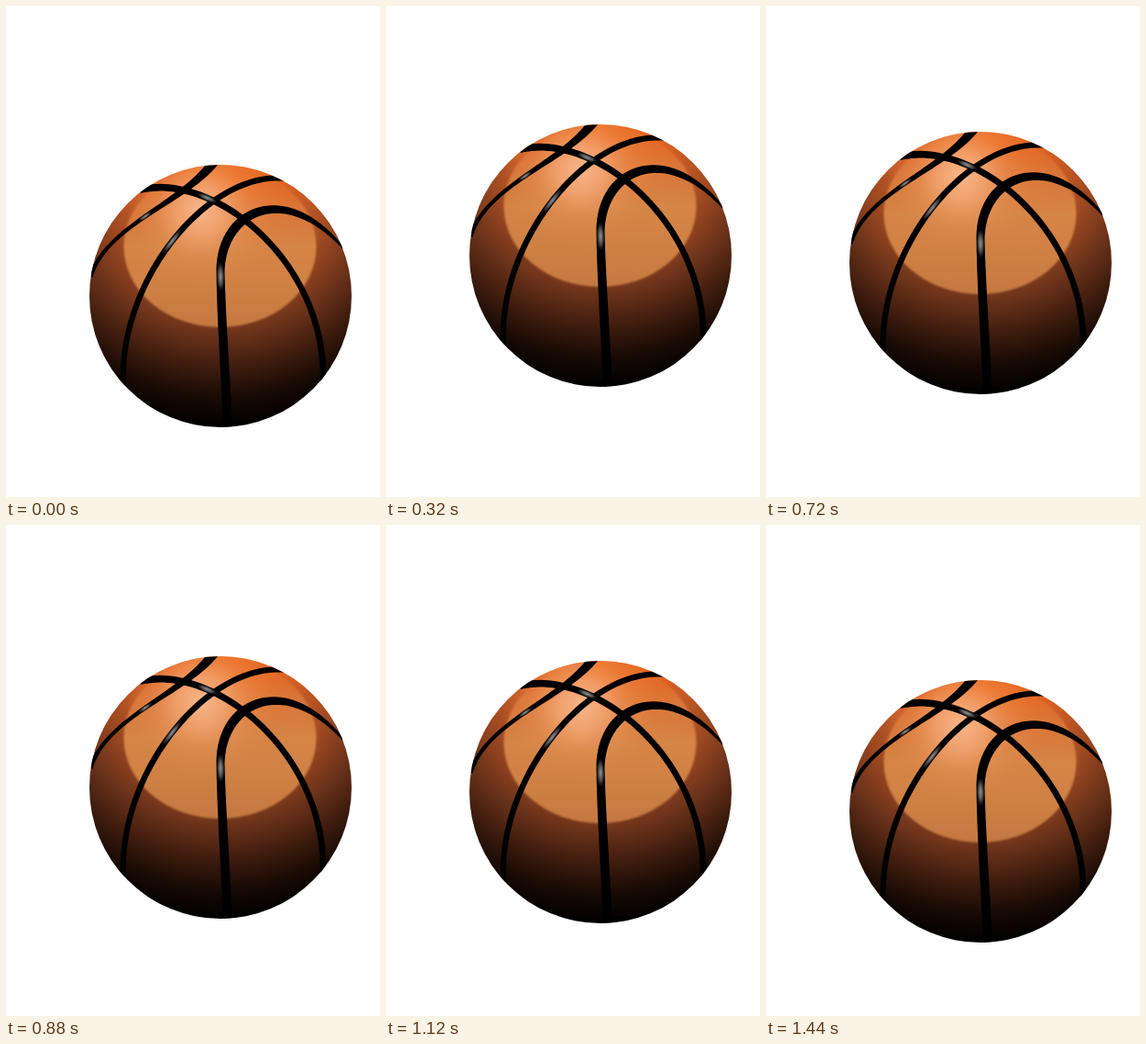
These frames come from a looping animation (408x535 px, 1480 ms). An HTML page with a canvas:

```html
<!DOCTYPE html>
<html lang="en">
<head>
<meta charset="utf-8">
<title>Floating basketball</title>
<style>
  html, body { margin: 0; width: 100%; height: 100%; overflow: hidden; background: #fff; }
  canvas { display: block; }
</style>
</head>
<body>
<canvas id="stage" width="408" height="535"></canvas>
<script>
const LOOP = 1480, STEP = 40, R = 143, TOP = 173;
const CX = 234, CY = TOP + R;

// Turning points of the float: [time in ms, top of the ball]
const keys = [[0, 173], [320, 129], [480, 134.4], [720, 137],
              [880, 143], [1000, 152], [1180, 146], [1440, 169.4]];

// Cubic curves with control values for a varying width; a glint sits at one place on some
const seams = [
  { path: [[228, 168], [196, 214], [111, 237], [92, 295]], width: [11, 2, 5], glint: { at: .52, length: 9 } },
  { path: [[146, 200], [231, 181], [351, 282], [346, 412]], width: [8, 6, 7], glint: { at: .27, length: 12 } },
  { path: [[306, 188], [222, 178], [122, 298], [128, 414]], width: [6, 7, 6], glint: { at: .51, length: 17 } },
  { path: [[368, 264], [305, 190], [234, 222], [234, 290]], width: [2.5, 13, 9] },
  { path: [[234, 290], [235, 345], [240, 410], [242, 465]], width: [9, 10, 10], glint: { at: .03, length: 16 } }
];

const mix = (a, b, u) => a + (b - a) * u;

// Repeated mixing of neighbours gives a point on a curve of any degree
function bezier(values, u) {
  while (values.length > 1) values = values.slice(1).map((v, i) => mix(values[i], v, u));
  return values[0];
}

function seamPoint({ path, width }, u) {
  const [x, y] = [0, 1].map(k => bezier(path.map(p => p[k]), u));
  const [dx, dy] = [0, 1].map(k => bezier(path.slice(1).map((p, i) => p[k] - path[i][k]), u));
  return { x, y, w: bezier(width, u), angle: Math.atan2(dy, dx) };
}

function keyAt(i) {
  const n = keys.length, turn = Math.floor(i / n), [t, y] = keys[i - turn * n];
  return [t + turn * LOOP, y];
}

// Speed at a key: zero where the ball turns back
function speed(i) {
  const [t0, y0] = keyAt(i - 1), [, y] = keyAt(i), [t1, y1] = keyAt(i + 1);
  return (y - y0) * (y1 - y) <= 0 ? 0 : (y1 - y0) / (t1 - t0);
}

function ballTop(time) {
  const i = keys.findLastIndex(([t]) => t <= time);
  const [t0, a] = keyAt(i), [t1, b] = keyAt(i + 1), third = (t1 - t0) / 3;
  return bezier([a, a + speed(i) * third, b - speed(i + 1) * third, b], (time - t0) / (t1 - t0));
}

function addStops(gradient, colors) {
  colors.forEach((color, i) => gradient.addColorStop(i / (colors.length - 1), color));
  return gradient;
}

function drawSeam(g, seam) {
  const left = [], right = [];
  for (let i = 0; i <= 60; i++) {
    const { x, y, w, angle } = seamPoint(seam, i / 60);
    const ox = -Math.sin(angle) * w / 2, oy = Math.cos(angle) * w / 2;
    left.push([x + ox, y + oy]);
    right.unshift([x - ox, y - oy]);
  }
  g.beginPath();
  for (const p of left.concat(right)) g.lineTo(...p);
  g.fillStyle = "#000";
  g.fill();
}

function drawGlint(g, seam) {
  const { x, y, w, angle } = seamPoint(seam, seam.glint.at);
  g.save();
  g.translate(x, y);
  g.rotate(angle);
  g.scale(seam.glint.length, w * .48);
  g.fillStyle = addStops(g.createRadialGradient(0, 0, 0, 0, 0, 1),
    ["rgba(185,185,185,.8)", "rgba(150,150,150,.55)", "rgba(110,110,110,0)"]);
  g.fillRect(-1, -1, 2, 2);
  g.restore();
}

function drawSheen(g) {
  g.save();
  g.filter = "blur(1.3px)";
  g.fillStyle = addStops(g.createLinearGradient(0, TOP, 0, 350),
    ["rgba(240,112,40,.15)", "rgba(222,126,62,.75)", "rgb(214,133,70)", "rgb(207,129,68)", "rgb(196,121,66)"]);
  g.beginPath();
  g.ellipse(233.5, 262, 105, 88, 0, 0, 7);
  g.fill();
  g.restore();
  g.fillStyle = addStops(g.createRadialGradient(213, 222, 0, 213, 222, 82),
    ["rgba(250,186,144,.95)", "rgba(246,174,126,.7)", "rgba(234,150,92,.3)", "rgba(224,140,80,0)"]);
  g.fillRect(130, TOP, 210, 150);
}

function makeBall() {
  const canvas = document.createElement("canvas");
  canvas.width = 408;
  canvas.height = 535;
  const g = canvas.getContext("2d");
  g.beginPath();
  g.arc(CX, CY, R, 0, 7);
  g.clip();
  g.fillStyle = addStops(g.createRadialGradient(CX, 190, 0, CX, 190, 268),
    ["#f06a1c", "#ea681f", "#dd6222", "#bd5725", "#964520", "#6c331a", "#421e0f", "#1a0b05", "#000"]);
  g.fillRect(0, 0, 408, 535);
  drawSheen(g);
  seams.forEach(seam => drawSeam(g, seam));
  seams.filter(seam => seam.glint).forEach(seam => drawGlint(g, seam));
  return canvas;
}

const ctx = document.getElementById("stage").getContext("2d");
const ball = makeBall();
const start = performance.now();

function draw() {
  const elapsed = (performance.now() - start) % LOOP;
  const time = Math.floor(elapsed / STEP) * STEP;
  ctx.fillStyle = "#fff";
  ctx.fillRect(0, 0, 408, 535);
  ctx.drawImage(ball, 0, Math.round(ballTop(time)) - TOP);
  requestAnimationFrame(draw);
}
draw();
</script>
</body>
</html>
```
